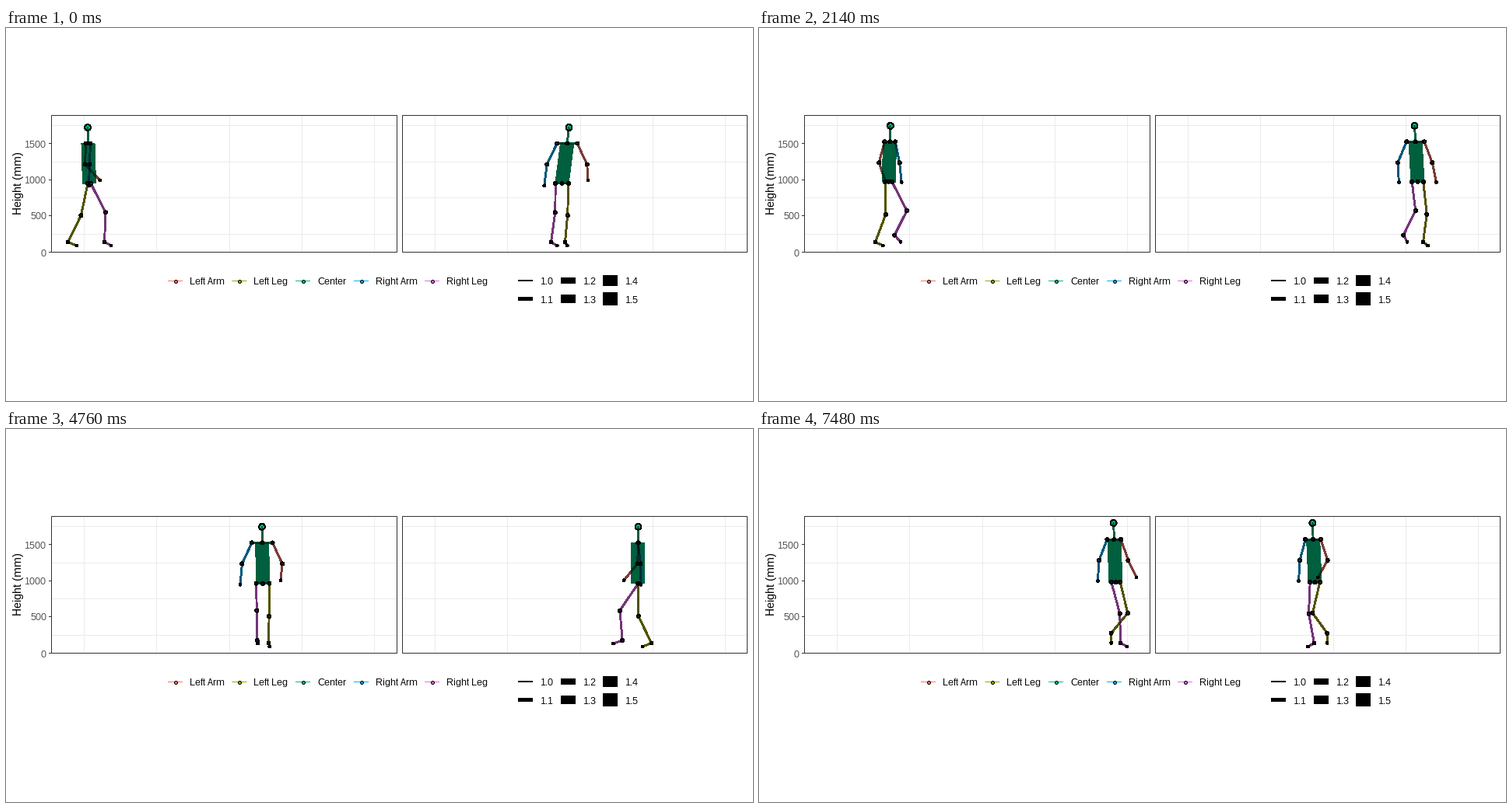
Animation of 960x480 px, one loop 7500 ms. Source, as a matplotlib script:

```python
import numpy as np
import matplotlib.pyplot as plt
from matplotlib.animation import FuncAnimation
from matplotlib.collections import LineCollection
from matplotlib.patches import Rectangle

W, H, DPI = 960, 480, 100
FRAMES, STEP = 375, 20
PX = 72 / DPI

PACE = .61                 # seconds from one footfall to the next
STANCE = .62               # seconds a foot stays down
THIGH, SHANK, FOOT = 42, 38.5, 12.5
GROUND = 275.5
L_ARM, L_LEG, MID, R_ARM, R_LEG = HUES = (
    "#F8766D", "#A3A500", "#00BF7D", "#00B0F6", "#E76BF3")

# Route of the pelvis: time, x in the left view, x in the right view, heading
ROUTE = np.array([
    [0, 107, 714.5, 13], [.4, 132, 719, 52], [.8, 146, 735, 90],
    [1.5, 154, 788, 74], [2.14, 166.5, 846.5, 31], [2.7, 208, 868, 14],
    [3.22, 250.5, 885, 3], [3.55, 275, 889, -15], [4.15, 314, 862, -58],
    [4.76, 330, 812.5, -89], [5.34, 331, 769, -72], [5.82, 349, 731.5, -27],
    [6.3, 385, 724, -6], [6.86, 420, 721, -14], [7.48, 458.5, 714.5, -42],
])
SLOPE = np.gradient(ROUTE[:, 1:], ROUTE[:, 0], axis=0)

# Places where the feet land, left and right in turn, one PACE apart
FALLS = np.array([
    (79.5, 718.5), (126.5, 700.5), (152.5, 745.5), (162, 783), (149.5, 853.5),
    (207, 864), (263.5, 895.5), (304, 868), (337.5, 829.5), (316.5, 778),
    (340.5, 726.5), (394, 717), (438, 733), (464.5, 713.5), (500, 712)])


def smooth(s):
    return s * s * (3 - 2 * s)


def walk(t):
    """Pelvis x, y and heading from a cubic Hermite spline."""
    T = ROUTE[:, 0]
    i = int(np.clip(np.searchsorted(T, t, "right") - 1, 0, len(T) - 2))
    d = T[i + 1] - T[i]
    s = (t - T[i]) / d
    h = smooth(s)
    return ((1 - h) * ROUTE[i, 1:] + h * ROUTE[i + 1, 1:]
            + d * s * (1 - s) * ((1 - s) * SLOPE[i] - s * SLOPE[i + 1]))


def axes_at(t):
    """Unit vectors forward and left."""
    a = np.radians(walk(t)[2])
    c, s = np.cos(a), np.sin(a)
    return np.array([c, s, 0]), np.array([-s, c, 0])


def trunk(t):
    """Head, neck and pelvis; the body leans into its turns."""
    x, y, _ = walk(t)
    _, left = axes_at(t)
    lean = .035 * (walk(t + .05)[2] - walk(t - .05)[2]) / .05 * left
    rise = 6 * (t / 7.5) ** 3
    bob = np.cos(2 * np.pi * (t / PACE - .5))
    base = np.array([x, y, 0])

    def at(z, lift, k):
        return base + k * lean + [0, 0, z - lift * rise - bob]

    return at(127, 1, 1.35), at(147.5, .9, 1), at(199, .3, 0)


def arm(t, shoulder, side):
    """Elbow and wrist; the left forearm is bent more than the right."""
    fwd, left = axes_at(t)
    s = side * np.cos(np.pi * t / PACE)
    bend, swing = (10, 9) if side > 0 else (3, 4.5)
    down = np.array([0, 0, 1])
    elbow = shoulder + (3 * s - 1) * fwd + 12.5 * side * left + 27 * down
    wrist = elbow + (bend + swing * s) * fwd - 3 * s * side * left + (25 - swing * s / 2) * down
    return elbow, wrist


def foot(t, side):
    """Ankle and toe: planted, or swinging on to the next landing place."""
    first = 0 if side > 0 else 1
    i = first + 2 * int((t / PACE + 1 - first) // 2)
    down = (i - 1) * PACE
    s = max(0, (t - down - STANCE) / (2 * PACE - STANCE))
    u = smooth(s)
    start, end = FALLS[i], FALLS[min(i + 2, len(FALLS) - 1)]
    ctrl = start + 50 * axes_at(max(0, down))[0][:2]
    xy = (1 - u) ** 2 * start + 2 * u * (1 - u) * ctrl + u * u * end
    arc = np.sin(np.pi * s ** .4)
    pitch = np.radians(22 + 105 * arc * (1 - 1.4 * s))
    fwd, _ = axes_at(np.clip(down + .3 + 2 * PACE * u, 0, 7.5))
    ankle = np.array([*xy, GROUND - 13 * arc])
    toe = ankle + FOOT * (np.cos(pitch) * fwd + [0, 0, np.sin(pitch)])
    toe[2] = min(toe[2], 280)
    return ankle, toe


def knee(hip, ankle, fwd):
    """Two-bone joint that bends towards fwd."""
    d = ankle - hip
    n = np.linalg.norm(d)
    d = d / n
    a = (THIGH ** 2 - SHANK ** 2 + n * n) / (2 * n)
    side = fwd - d * (fwd @ d)
    bend = np.sqrt(max(0, THIGH ** 2 - a * a))
    return hip + a * d + bend * side / np.linalg.norm(side)


def pose(t):
    """All joints, in the order head, neck, pelvis, left side, right side."""
    fwd, left = axes_at(t)
    head, neck, pelvis = trunk(t)
    joints = [head, neck, pelvis]
    for side in (1, -1):
        shoulder, hip = neck + 13.3 * side * left, pelvis + 8.5 * side * left
        ankle, toe = foot(t, side)
        joints += [shoulder, *arm(t, shoulder, side),
                   hip, knee(hip, ankle, fwd), ankle, toe]
    return np.array(joints)


HEAD, NECK, PELVIS = range(3)
L, R = 3, 10               # first joint of each side


def chain(hue, *joints):
    return [(a, b, hue, 1.9) for a, b in zip(joints, joints[1:])]


BONES = [*chain(L_ARM, L, L + 1, L + 2), *chain(L_LEG, *range(L + 3, L + 7)),
         (NECK, PELVIS, MID, 17), *chain(MID, HEAD, NECK),
         *chain(MID, L, NECK, R), *chain(MID, L + 3, PELVIS, R + 3),
         *chain(R_ARM, R, R + 1, R + 2), *chain(R_LEG, *range(R + 3, R + 7))]
ENDS = np.array([b[:2] for b in BONES])
DOT_HUES = [MID] * 3 + [L_ARM] * 3 + [L_LEG] * 4 + [R_ARM] * 3 + [R_LEG] * 4
DOT_SIZE = np.full(17, 4.0)
DOT_SIZE[HEAD] = 7.8
DOT_SIZE[[L + 2, L + 6, R + 2, R + 6]] = 2.8

plt.rcParams.update({"font.family": "Liberation Sans", "path.snap": False,
                     "text.hinting": "default", "text.hinting_factor": 1})
fig = plt.figure(figsize=(W / DPI, H / DPI), dpi=DPI, facecolor="white")
ax = fig.add_axes([0, 0, 1, 1])
ax.axis("off")


def line(x, y, color, width=1):
    ax.plot(x, y, color=color, lw=width * PX, zorder=0, solid_capstyle="butt")


def label(x, y, text, size=12, color="black", va="center_baseline", **kw):
    ax.text(x, y, text, fontsize=size * PX, color=color, va=va, **kw)


def dots(xy, sizes, hues, z):
    return ax.scatter(*np.transpose(xy), s=(np.array(sizes) * PX) ** 2, c=hues,
                      edgecolors="black", linewidths=PX, zorder=z, antialiased=False)


# Panels
for x0, x1, first in ((58.5, 502.5, 100), (509.5, 952.5, 551)):
    for k in range(5):
        x = round(first + 93.3 * k) + .5
        line([x, x], [112, 288], "#EBEBEB")
    for k in range(4):
        y = round(125 + 46.67 * k) + .5
        line([x0, x1], [y, y], "#EBEBEB")
    ax.add_patch(Rectangle((x0, 112.5), x1 - x0, 176, fill=False, ec="#333333",
                           lw=PX, zorder=6))
for k in range(4):
    y = round(288 - 46.67 * k) + .5
    line([55, 58], [y, y], "#333333")
    label(52, y + .5, str(500 * k), color="#4D4D4D", ha="right")
label(16, 199.5, "Height (mm)", 14.8, rotation=90, ha="center", va="center")

# Legends
names = ("Left Arm", "Left Leg", "Center", "Right Arm", "Right Leg")
for x, tx, hue, name in zip((217.5, 300, 381.5, 456.5, 547.5), (236, 318, 400, 475, 566),
                            HUES, names):
    line([x - 9.5, x + 9.5], [325.5, 325.5], hue)
    dots([(x, 325.5)], [4], [hue], 2)
    label(tx, 326, name)
for k in range(6):
    col, row = divmod(k, 2)
    x, y = round(658 + 54.6 * col), 325 + 23.5 * row
    line([x, x + 19], [y, y], "black", 2 + 3 * k)
    label(x + 29, y + 1, f"1.{k}")


def view():
    """Coloured bones, joints, and a half-black layer over them."""
    blank = np.zeros((len(BONES), 2, 2))
    look = dict(linewidths=[b[3] * PX for b in BONES], antialiaseds=False)
    hue = LineCollection(blank, colors=[b[2] for b in BONES], zorder=2, **look)
    shade = LineCollection(blank, colors=[(0, 0, 0, .5)], zorder=4, **look)
    ax.add_collection(hue, autolim=False)
    ax.add_collection(shade, autolim=False)
    return hue, dots(np.zeros((17, 2)), DOT_SIZE, DOT_HUES, 3), shade


views = [view(), view()]
ax.set_xlim(0, W)
ax.set_ylim(H, 0)


def draw(i):
    p = pose(i * STEP / 1000)
    for axis, (hue, joints, shade) in enumerate(views):
        xy = p[:, [axis, 2]]
        hue.set_segments(xy[ENDS])
        shade.set_segments(xy[ENDS])
        joints.set_offsets(xy)
    return [a for v in views for a in v]


anim = FuncAnimation(fig, draw, frames=FRAMES, interval=STEP, repeat=True,
                     repeat_delay=0, blit=False)
plt.show()
```
